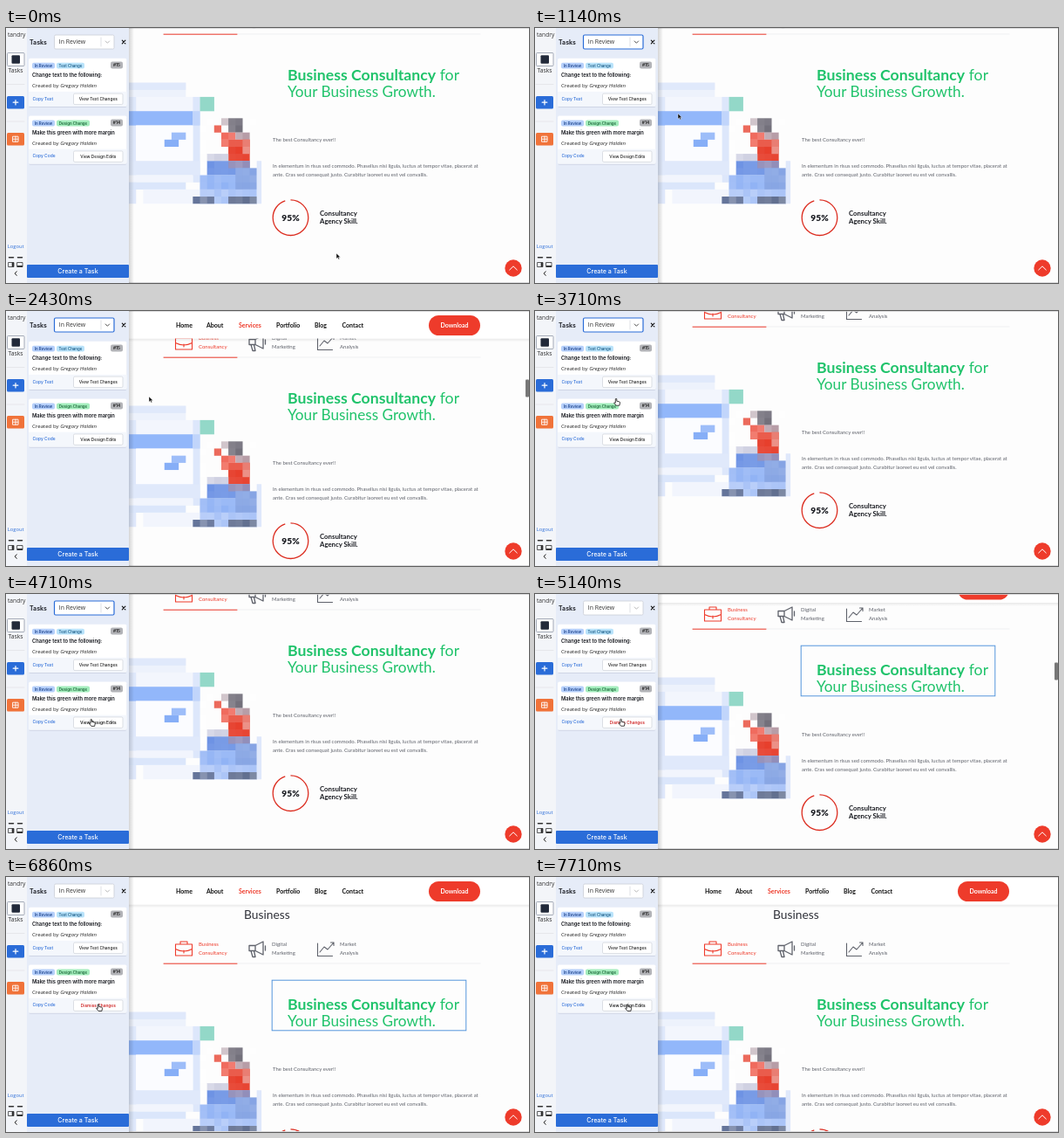
Recreate the animation shown at these times as an HTML page. Size 600 by 292 pixels, loop 8 s.

```html
<!DOCTYPE html>
<html lang="en">
<head>
<meta charset="utf-8">
<title>Task panel</title>
<style>
  html, body { margin: 0; width: 100%; height: 100%; overflow: hidden; background: #fdfdfd; }
  svg { display: block; width: 600px; height: 292px; }
  text { white-space: pre; }
  .lato { font-family: Lato, sans-serif; }
  .open { font-family: "Open Sans", sans-serif; }
  .inter { font-family: Inter, sans-serif; }
  .line { fill: none; stroke-linecap: round; stroke-linejoin: round; }
</style>
</head>
<body>
<svg id="stage" viewBox="0 0 600 292"></svg>
<script>
const RED = '#ee3b2b', BLUE = '#2a6cd8', GREEN = '#20c36b', INK = '#17191f', GREY = '#5f626b';

// y is the vertical middle of the capitals
const text = (x, y, size, str, fill, font = 'lato', more = '') =>
  `<text class="${font}" x="${x}" y="${(y + size * 0.36).toFixed(2)}" font-size="${size}" fill="${fill}" ${more}>${str}</text>`;
const rect = (x, y, w, h, fill, more = '') =>
  `<rect x="${x}" y="${y}" width="${w}" height="${h}" fill="${fill}" ${more}/>`;
const line = (d, stroke, width = 1, more = '') =>
  `<path class="line" d="${d}" stroke="${stroke}" stroke-width="${width}" ${more}/>`;
const BOLD = 'font-weight="700"', SEMI = 'font-weight="600"', MEDIUM = 'font-weight="500"';
const MID = 'text-anchor="middle"';

// Blocky illustration: column, row, width, height in cells
function mosaic() {
  const cell = 8.15, left = 141, top = 62.6;
  const block = (c, r, w, h, fill) => rect(left + c * cell, top + r * cell, w * cell + .1, h * cell + .1, fill);
  const blocks = [
    [0, 0, 8, 2, '#edf2fc'], [0, 0, 8, 1, '#e0e9fb'], [0, 2, 9, 2, '#f3f6fd'],
    [0, 2, 1, 15, '#dfe8fb'], [9, 2, 1, 12, '#dde7fb'], [0, 4, 9, 2, '#92b7fa'],
    [9, 4, 1, 2, '#c1d5fb'], [1, 6, 8, 5, '#fbfcff'], [6, 7, 2, 1, '#9dbdf9'],
    [5, 8, 2, 1, '#86aef7'], [0, 11, 10, 2, '#e0e9fb'], [0, 13, 9, 1, '#f2f5fd'],
    [0, 14, 8, 1, '#dbe6fb'], [2, 15, 8, 2, '#f2f5fd'],
    [10, 2, 2, 2, '#93d8c8'], [13, 5, 1, 1, '#cfc2c8'], [14, 5, 2, 2, '#6b6874'],
    [12, 6, 1, 1, '#e8503f'], [13, 7, 2, 1, '#ee5a4c'], [15, 7, 2, 1, '#b59aa4'],
    [13, 8, 1, 1, '#f0685a'], [14, 8, 3, 3, '#e5331f'], [16, 8, 1, 2, '#e77367'],
    [11, 10, 3, 1, '#cfd0e2'], [11, 11, 6, 2, '#6c92e4'], [14, 11, 3, 1, '#8580b0'],
    [10, 13, 6, 2, '#8aaef4'], [15, 12, 3, 3, '#7f9fe2'], [10, 15, 8, 2, '#a9c3f7'],
    [9, 16, 3, 1, '#65759a'], [14, 16, 4, 1, '#5d6b8c'], [18, 11, .65, 6, '#dfe8fb']
  ];
  let out = blocks.map(b => block(...b)).join(''), seed = 7;
  const rnd = () => (seed = seed * 16807 % 2147483647) / 2147483647;
  for (let r = 5; r < 17; r++)
    for (let c = 10; c < 18; c++)
      out += `<g opacity="${(rnd() * .22).toFixed(2)}">${block(c, r, 1, 1, '#fff')}</g>`;
  return out;
}

function page() {
  const tab = (x, a, b, fill) => text(x, -15, 6, a, fill) + text(x, -5.3, 6, b, fill);
  return text(273, -49, 13.8, 'Business', '#30323a') +
    tab(221, 'Business', 'Consultancy', RED) + tab(305, 'Digital', 'Marketing', GREY) + tab(383, 'Market', 'Analysis', GREY) +
    '<g transform="translate(0 1)">' +
    line('M194.500-16h19v13h-19zM194.500-10.500q9.500 5 19 0M200-16v-3h8v3M204-9v3', RED, 1.1) +
    line('M279-14.500h7l9-4.500v15l-9-4.500h-7zM286-14.500v6M281-8.500l2 7h3l-1.500-7M297.500-14v5', GREY, 1.3) +
    line('M357.500-17v14.500h17M360-7l5-6 4 3 7-8M372.500-18h3.500v3.500', GREY, 1.1) + '</g>' +
    line('M181 7H544', '#e9eaed', .7) + line('M181 7.200H265', RED, 1) +
    text(323, 53.200, 17.700, `<tspan ${BOLD}>Business Consultancy</tspan> for`, GREEN) +
    text(323, 73.200, 17.200, 'Your Business Growth.', GREEN) +
    '<rect id="outline" x="305.200" y="26.200" width="222.600" height="57.600" fill="none" stroke="#5596dc"/>' +
    text(306, 128, 5.950, 'The best Consultancy ever!!', GREY) +
    text(306, 157.800, 5.950, 'In elementum in risus sed commodo. Phasellus nisi ligula, luctus at tempor vitae, placerat at', GREY) +
    text(306, 168, 5.950, 'ante. Cras sed consequat justo. Curabitur laoreet eu est vel convallis.', GREY) +
    '<circle cx="326.500" cy="217.200" r="20.300" fill="none" stroke="#dc2d20" stroke-width="1.300" pathLength="100" stroke-dasharray="95 100" transform="rotate(-90 326.500 217.200)"/>' +
    text(326.500, 217, 10.200, '95%', INK, 'lato', `font-weight="900" ${MID}`) +
    text(360, 212.300, 7.800, 'Consultancy', INK, 'lato', BOLD) +
    text(360, 221.500, 7.800, 'Agency Skill.', INK, 'lato', BOLD) +
    mosaic();
}

function header() {
  const items = { Home: 195, About: 230, Services: 267, Portfolio: 310, Blog: 354, Contact: 385.500 };
  return rect(124, 31.500, 476, 4, 'url(#fall)') + rect(124, -2, 476, 33.500, '#fff') +
    Object.entries(items).map(([s, x]) => text(x, 16.500, 7, s, s === 'Services' ? RED : '#111', 'lato', BOLD)).join('') +
    rect(485, 5, 59, 23, RED, 'rx="11.500"') + text(514.500, 16.500, 7, 'Download', '#fff', 'lato', `${BOLD} ${MID}`);
}

function card(y, kind, tagWidth, tagFill, tagInk, id, title, copy, button, name) {
  const pill = (x, w, fill, s, ink) => rect(x, y + 5, w, 6.800, fill, 'rx="2"') +
    text(x + w / 2, y + 8.400, 4.400, s, ink, 'inter', `${MID} ${SEMI}`);
  return rect(26, y + .6, 112.500, 55.500, '#cfd6e6', 'rx="2"') + rect(26, y, 112.500, 55, '#fff', 'rx="2"') +
    rect(26, y + 38, 112.500, 17, '#f4f7fc') +
    pill(30, 26, '#b5cffa', 'In Review', '#234a91') + pill(58, tagWidth, tagFill, kind, tagInk) +
    rect(120, y + 3.800, 14, 8, '#b2b3b7', 'rx="2"') + text(127, y + 7.800, 4.800, id, '#222', 'inter', `${MID} ${SEMI}`) +
    text(30, y + 19.500, 5.800, title, INK, 'inter', SEMI) +
    text(30, y + 31, 6.100, 'Created by <tspan font-style="italic">Gregory Halden</tspan>', '#222', 'open') +
    text(30.500, y + 46, 4.900, copy, BLUE, 'inter', MEDIUM) +
    rect(77.500, y + 40.300, 56.500, 12.500, '#fff', 'rx="1.500" stroke="#d3d7de" stroke-width=".8"') +
    text(105.800, y + 46.200, 4.800, button, '#222', 'inter', `${MID} ${MEDIUM} id="${name}"`);
}

function panel() {
  return rect(0, 0, 24, 292, '#f3f5f9') + rect(141, 0, 6, 292, 'url(#side)') + rect(24, 0, 117, 292, '#e6ecf8') +
    line('M1 64.500H21M1 107H21', '#e4e2e6', .8) +
    text(2, 8, 6.700, 'tandry', '#333', 'open') +
    rect(1.500, 28.500, 19.500, 15, '#fff', 'rx="1" stroke="#8d96a5" stroke-width=".8"') + rect(6.500, 31.200, 9.500, 9.500, '#222a3a', 'rx="1"') +
    text(2.500, 48.500, 6.800, 'Tasks', '#333', 'open') +
    rect(1, 78, 20, 14.500, BLUE, 'rx="1.500"') + line('M11 82.500v5.500M8.200 85.200h5.600', '#fff', 1.2) +
    rect(1, 120, 20, 14.500, '#f0733a', 'rx="1.500"') + line('M8 124.200h6v6h-6zM11 124.200v6M8 127.200h6', '#fff', .9) +
    text(1.800, 249.500, 5.800, 'Logout', BLUE, 'open') +
    line('M3.500 262.800h5M13.500 262.800h5', '#333', 1.5) +
    line('M3 268.500h6v5h-6zM13 268.500h6v5h-6z', '#333', .8) + rect(6.700, 268.500, 2.300, 5, '#333') + rect(13, 272, 6, 1.800, '#333') +
    line('M12.200 278.800l-2 2.300 2 2.300', '#222', 1) +
    text(27, 16, 7, 'Tasks', INK, 'inter', SEMI) +
    '<rect id="select" x="55.500" y="8" width="68.500" height="16" rx="1.500" fill="#fff"/>' +
    text(60.800, 16, 6.900, 'In Review', '#333', 'open') + line('M109 11v10', '#d0d3da', .7) +
    line('M114.200 15l2.200 2.300 2.200-2.300', '#bbb', 1, 'id="chevron"') +
    line('M133.300 14.200l3.600 3.600M136.900 14.200l-3.600 3.600', '#111', 1.2) +
    card(34.800, 'Text Change', 32, '#b9e3fa', '#23628c', '#15', 'Change text to the following:', 'Copy Text', 'View Text Changes', 'viewText') +
    card(100.600, 'Design Change', 38, '#a4edbd', '#1f6b3c', '#14', 'Make this green with more margin', 'Copy Code', 'View Design Edits', 'viewDesign') +
    rect(24, 271, 117, 15, BLUE, 'rx="1"') + text(82.500, 278.500, 7.100, 'Create a Task', '#fff', 'inter', `${MID} ${MEDIUM}`);
}

const stage = document.getElementById('stage');
stage.innerHTML = `<defs>
  <linearGradient id="side"><stop stop-color="#000" stop-opacity=".16"/><stop offset="1" stop-opacity="0"/></linearGradient>
  <linearGradient id="fall" x2="0" y2="1"><stop stop-color="#000" stop-opacity=".08"/><stop offset="1" stop-opacity="0"/></linearGradient>
</defs>` + rect(0, 0, 600, 292, '#fdfdfd') +
  `<g id="page">${page()}</g><g id="header">${header()}</g>` +
  rect(596, 78.500, 4, 20, '#777', 'id="thumb" rx="1"') +
  `<circle cx="582" cy="275" r="9.700" fill="${RED}"/>` + line('M577.700 277l4.300-4.200 4.300 4.200', '#fff', 1) +
  rect(124, 0, 476, .8, '#d2d2d4') + rect(124, 291, 476, 1, '#d8d8da') + panel() +
  `<g id="cursor"><path id="arrow" d="M0 0v6.200l1.500-1.400 1 2.200 1.100-.5-1-2.100h2z" fill="#111" stroke="#fff" stroke-width=".4"/>
   <path id="hand" d="M-.7 0q.8-.9 1.500 0v2.500l3 .7q.8.300.7 1.200l-.6 3.100h-3.800l-2.500-3q.3-.9 1.700 0z" fill="#fff" stroke="#111" stroke-width=".8" stroke-linejoin="round"/></g>`;

const el = Object.fromEntries([...stage.querySelectorAll('[id]')].map(e => [e.id, e]));
const show = (e, on) => e.setAttribute('visibility', on ? 'visible' : 'hidden');
const paint = (e, attrs) => { for (const k in attrs) e.setAttribute(k, attrs[k]); };

// Linear track through [tick, value] points
function track(points, n) {
  const i = points.findIndex(p => p[0] > n);
  if (i < 0) return points.at(-1)[1];
  if (i === 0) return points[0][1];
  const [a, va] = points[i - 1], [b, vb] = points[i];
  return va + (vb - va) * (n - a) / (b - a);
}

const scroll = [[8, 0], [12, 18.5], [16, 50], [17, 46], [23, 11], [34, 11], [36, 33], [40, 85], [42, 92]];
const headerY = [[8, -36], [11, 0], [17, 0], [20, -36], [35, -36], [36, -21.5], [38, 0]];
const cursorX = [[0, 379], [4, 118], [5, 118], [8, 164], [24, 164], [26, 93], [30, 97], [36, 98.5], [42, 105], [47, 106]];
const cursorY = [[0, 258], [4, 17], [5, 17], [8, 98], [24, 98], [26, 100.7], [30, 144], [36, 143.7], [42, 149], [47, 146]];

function draw(now) {
  const n = Math.floor((now % 8000 + 5) * 7 / 1000) % 56;
  const focused = n >= 5 && n < 35, preview = n >= 35 && n < 50, hover = n >= 30;
  const overPanel = n >= 25;

  paint(el.page, { transform: `translate(0 ${track(scroll, n)})` });
  paint(el.header, { transform: `translate(0 ${track(headerY, n)})` });
  paint(el.cursor, { transform: `translate(${track(cursorX, n)} ${track(cursorY, n)})` });
  show(el.hand, overPanel);
  show(el.arrow, !overPanel);
  show(el.thumb, (n >= 9 && n <= 23) || (n >= 35 && n < 42));
  show(el.outline, preview);
  paint(el.select, { stroke: focused ? BLUE : '#c9cdd6', 'stroke-width': focused ? 1.2 : .8 });
  paint(el.chevron, { stroke: focused ? '#555' : '#bbb' });
  el.viewDesign.textContent = preview ? 'Dismiss Changes' : 'View Design Edits';
  paint(el.viewDesign, { fill: preview ? '#d02a2a' : '#222', 'font-weight': hover ? 600 : 500 });
  requestAnimationFrame(draw);
}
requestAnimationFrame(draw);
</script>
</body>
</html>
```
